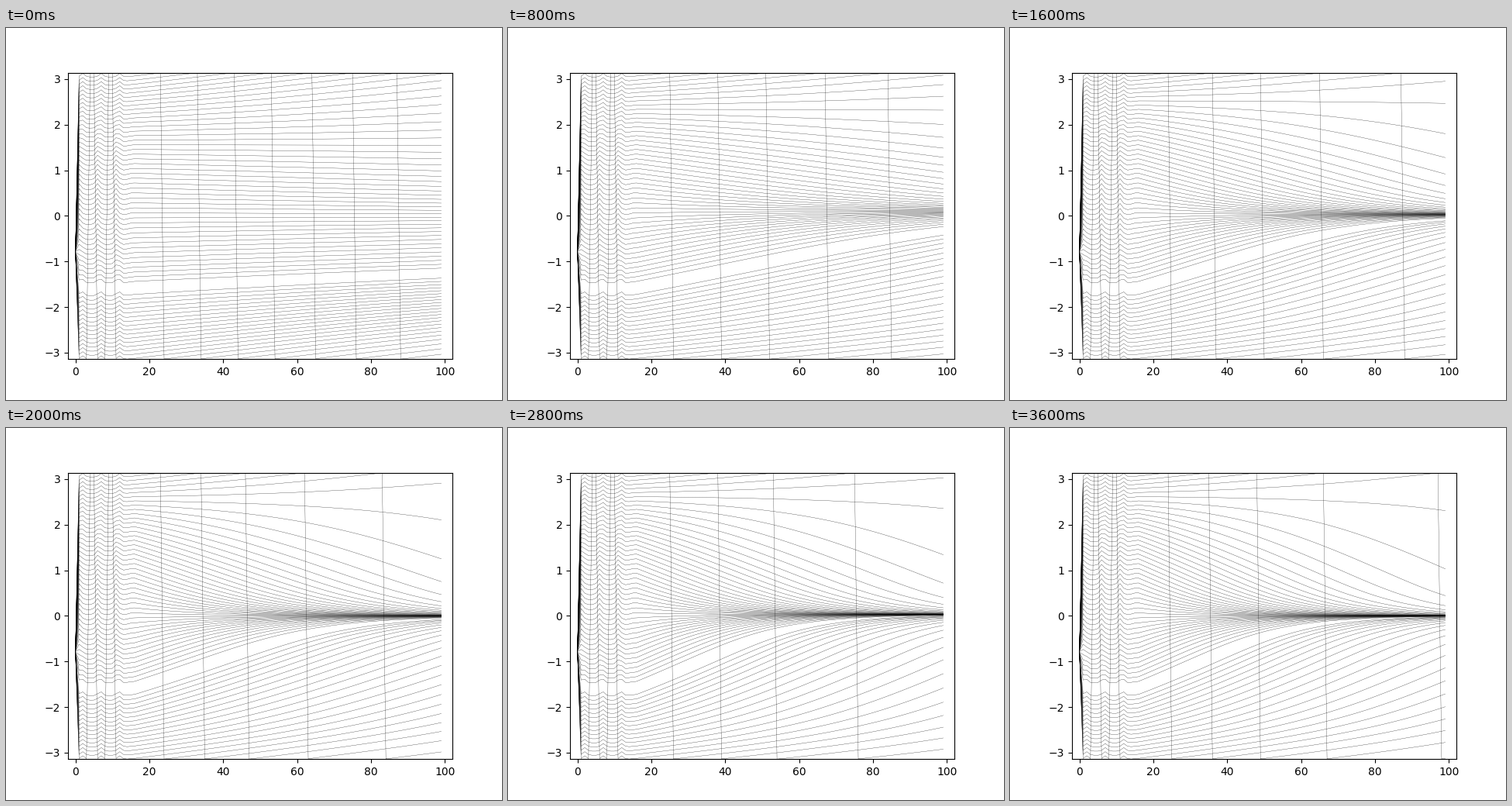
Write a matplotlib script that moves like this. It is 640 px wide and 480 px high and loops after 4000 ms.

```python
import numpy as np
import matplotlib.pyplot as plt
from matplotlib.animation import FuncAnimation

STEPS = 100
CUE = 16          # jittered steps before the free flow
STAGES = 10
START = -0.79
HARMONICS = (0.0333, 0.0097, 0.0014, 0.0020)


def wrap(a):
    return (a + np.pi) % (2 * np.pi) - np.pi


def velocity(th, stage):
    """Phase speed: a pull to zero that grows by stage, plus a push near +-pi."""
    pull = 0.07 + 0.93 * np.sin(np.pi / 2 * stage / (STAGES - 1))
    drift = np.interp(stage, [0, 1, 3, 5, 6, 8, 9],
                      [0, 0.0026, 0.0028, 0, 0.0017, 0.0021, 0])
    push = 0.0096 - 1.7 * drift
    odd = sum(b * np.sin(n * th) for n, b in enumerate(HARMONICS, 1))
    bump = ((1 - np.cos(th)) / 2) ** (2 + 2 * pull)
    return drift + push * bump - pull * odd


def jitter(th, t):
    """A pulse every five steps, weaker and one step later near +-pi."""
    far = (1 - np.cos(th - 0.3)) / 2
    turn = 2 * np.pi * (t - 1 - far) / 5
    pulse = np.exp(2 * (np.cos(turn) - 1)) - 0.31
    fade = np.clip((CUE - t) / 3, 0, 1)
    return (0.14 - 0.06 * far) * pulse * fade


def phases(stage):
    x = -1.34 + 0.1 * np.arange(61)
    th = x + 0.1 * np.sin(x)
    rows = [np.full_like(th, START)]
    rows += [th + jitter(th, t) for t in range(1, CUE + 1)]
    while len(rows) < STEPS:
        th = th + velocity(th, stage)
        rows.append(th)
    return wrap(np.array(rows))


fig, ax = plt.subplots(figsize=(6.4, 4.8), dpi=100)
lines = ax.plot(np.arange(STEPS), phases(0), color="black", lw=0.2)
ax.set_xlim(-2, 102)
ax.set_ylim(-np.pi, np.pi)


def update(i):
    for line, y in zip(lines, phases(i).T):
        line.set_ydata(y)
    return lines


anim = FuncAnimation(fig, update, frames=STAGES, interval=400,
                     repeat=True, repeat_delay=0)
plt.show()
```
